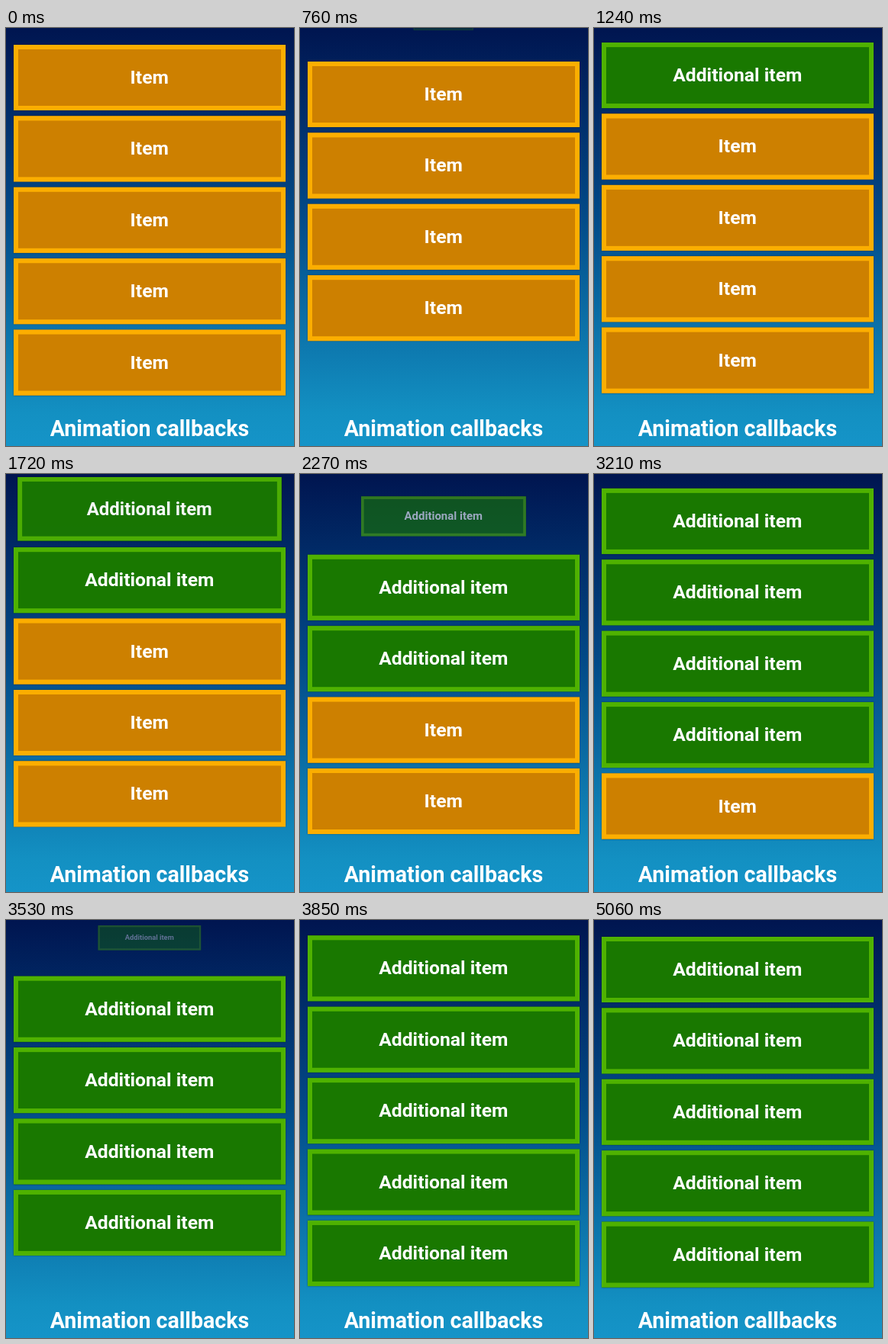
An HTML page for the animation above (5160 ms loop, 377 by 548 pixels).

```html
<!DOCTYPE html>
<html lang="en">
<head>
<meta charset="utf-8">
<title>Animation callbacks</title>
<style>
  html, body { margin: 0; width: 100%; height: 100%; overflow: hidden; }
  body {
    position: relative;
    background: linear-gradient(#001550, #024a88 45%, #1390c2 92%, #1594c8);
    color: #fff;
    font: 700 24.7px Roboto, sans-serif;
    text-align: center;
  }
  .item {
    position: absolute;
    left: 10px;
    top: 21.8px;
    width: 355.5px;
    height: 86px;
    box-sizing: border-box;
    border: 6.5px solid #fcae00;
    background: #cd8000;
    box-shadow: 0 0 2px rgba(0, 0, 0, .4);
    line-height: 74px;
  }
  .item.added { border-color: #4fb200; background: #197800; }
  h1 {
    position: absolute;
    left: 0;
    top: 505px;
    width: 376px;
    margin: 0;
    font-size: 28.6px;
    line-height: 40px;
  }
</style>
</head>
<body>
<h1>Animation callbacks</h1>
<script>
const LOOP = 5160, DURATION = 680, PITCH = 93.4;
const starts = [641, 1298, 1995, 2697, 3347];

const items = starts.map(() => {
  const el = document.createElement('div');
  el.className = 'item';
  document.body.insertBefore(el, document.querySelector('h1'));
  return el;
});

const clamp = v => Math.min(1, Math.max(0, v));

function bounceOut(u) {
  const n = 7.5625, d = 2.75;
  if (u < 1 / d) return n * u * u;
  if (u < 2 / d) return n * (u - 1.5 / d) ** 2 + .75;
  if (u < 2.5 / d) return n * (u - 2.25 / d) ** 2 + .9375;
  return n * (u - 2.625 / d) ** 2 + .984375;
}

function draw(t) {
  const added = starts.filter(s => s <= t).length;
  const u = added ? clamp((t - starts[added - 1]) / DURATION) : 1;
  const shift = PITCH * (bounceOut(u) - 1);
  const grow = clamp((u - .046) * 1.684);

  items.forEach((el, i) => {
    const isNew = i < added;
    const size = i ? 1 : grow;
    el.classList.toggle('added', isNew);
    el.textContent = isNew ? 'Additional item' : 'Item';
    el.style.transform = `translateY(${i * PITCH + shift}px) scale(${size})`;
    el.style.opacity = size;
  });
}

const begin = performance.now();
function tick() {
  draw((performance.now() - begin) % LOOP);
  requestAnimationFrame(tick);
}
tick();
</script>
</body>
</html>
```
